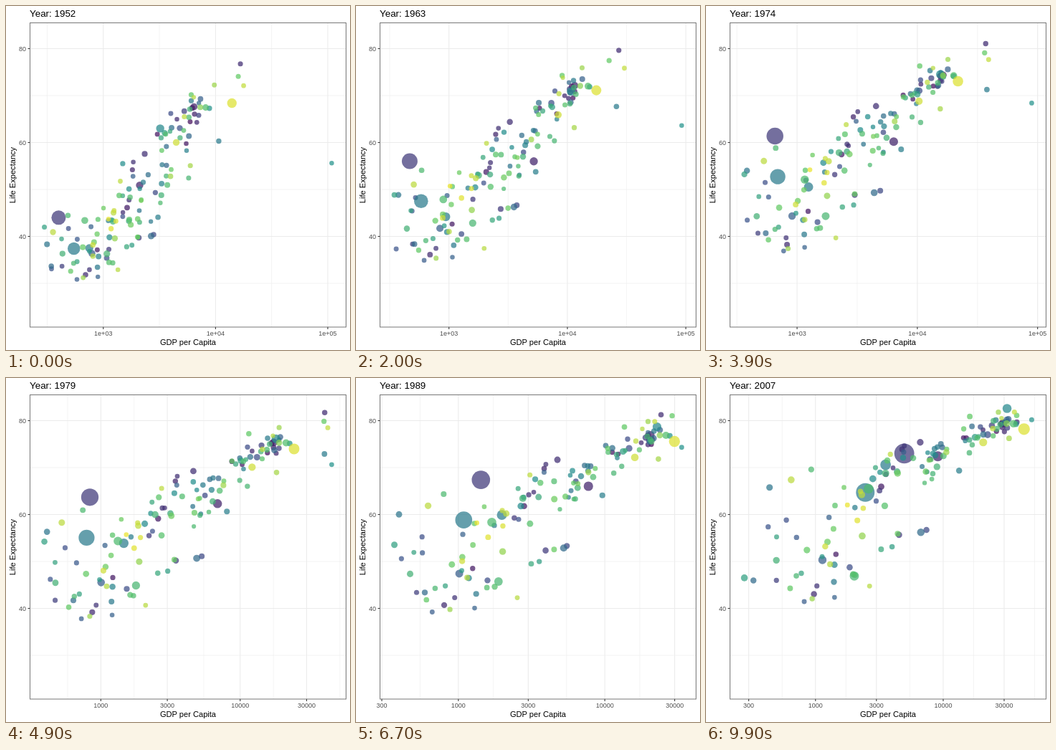
An HTML page that plays this animation: 480 by 480 pixels, repeating every 10000 ms.

```html
<!DOCTYPE html>
<html lang="en">
<head>
<meta charset="utf-8">
<title>Life expectancy by GDP</title>
<style>
  html, body { margin: 0; width: 100%; height: 100%; overflow: hidden; background: #fff; }
  svg { display: block; width: 480px; height: 480px; }
  text { font-family: "Liberation Sans", Arial, sans-serif; fill: #000; }
  .tick { font-size: 9px; fill: #4d4d4d; }
  .name { font-size: 11.1px; text-anchor: middle; }
  .head { font-size: 13.4px; }
  .grid { stroke: #ebebeb; stroke-width: 1.07; }
  .minor { stroke-width: .53; }
  .mark { stroke: #333; stroke-width: 1.07; }
</style>
</head>
<body>
<svg id="chart" viewBox="0 0 480 480">
  <rect width="480" height="480" fill="#fff"/>
  <g id="gridY"></g>
  <g id="gridX"></g>
  <g id="dots" fill-opacity=".72"></g>
  <rect x="33.5" y="23.5" width="441" height="424.5" fill="none" stroke="#777" stroke-width="1"/>
  <g id="axisX"></g>
  <text class="name" x="254" y="473">GDP per Capita</text>
  <text class="name" transform="translate(13 236) rotate(-90)">Life Expectancy</text>
  <text class="head" id="year" x="33" y="15"></text>
</svg>
<script>
const LOOP = 10000, STEP = 100, LAST = 99;
const LEFT = 33.5, RIGHT = 474.5, TOP = 23.5, BOTTOM = 448;
const RANKS = 141, MOST = 1319;
const $ = id => document.getElementById(id);

function add(parent, tag, attrs, text) {
  const el = document.createElementNS('http://www.w3.org/2000/svg', tag);
  for (const key in attrs) el.setAttribute(key, attrs[key]);
  if (text) el.textContent = text;
  parent.appendChild(el);
  return el;
}

const mix = ([a, b], p) => a + (b - a) * p;
const clamp = (v, a, b) => Math.min(b, Math.max(a, v));

// Reflect values that pass an edge, so nothing piles up there
function fold(v, lo, hi) {
  if (v < lo) v = 2 * lo - v;
  if (v > hi) v = 2 * hi - v;
  return clamp(v, lo, hi);
}

// Seeded noise, roughly normal with deviation 1
let seed = 1952;
function rand() {
  seed = (seed * 1664525 + 1013904223) % 4294967296;
  return seed / 4294967296;
}
const noise = () => (rand() + rand() + rand() - 1.5) * 2;

// Straight lines between [frame, value] keys
function track(keys, frame) {
  const i = Math.max(1, keys.findIndex(k => k[0] >= frame));
  const [f0, v0] = keys[i - 1], [f1, v1] = keys[i];
  return mix([v0, v1], (frame - f0) / (f1 - f0));
}

function colour(p) {
  const stops = [[68, 1, 84], [59, 82, 139], [33, 144, 140], [93, 200, 99], [253, 231, 37]];
  const i = Math.min(Math.floor(p * 4), 3);
  return `rgb(${stops[i].map((v, k) => Math.round(mix([v, stops[i + 1][k]], p * 4 - i)))})`;
}

// Ends of the data on the log10 scale
const low = [[0, 2.475], [9, 2.526], [45, 2.569], [54, 2.627], [81, 2.494], [90, 2.382], [99, 2.443]];
const high = [[0, 5.035], [9, 5.055], [27, 4.908], [36, 5.039], [54, 4.51], [63, 4.499], [81, 4.616], [99, 4.693]];

// Largest bubbles: people in millions, log GDP and life from start to end.
// The ease powers make growth early (below 1) or late (above 1).
const leaders = [
  { rank: 24, people: [556, 1319], gdp: [2.602, 3.695], gdpEase: 1.75, life: [44, 73], lifeEase: .55 },
  { rank: 58, people: [372, 1110], gdp: [2.738, 3.39], gdpEase: 2, life: [37.4, 64.7], lifeEase: .62 },
  { rank: 134, people: [158, 301], gdp: [4.146, 4.633], gdpEase: 1, life: [68.4, 78.2], lifeEase: .8 },
  { rank: 59, people: [82, 224], gdp: [2.875, 3.549], gdpEase: 1.2, life: [37.5, 70.6], lifeEase: 1 },
  { rank: 14, people: [57, 190], gdp: [3.324, 3.958], gdpEase: .3, life: [50.9, 72.4], lifeEase: .9 },
  { rank: 66, people: [86, 127], gdp: [3.507, 4.5], gdpEase: .4, life: [63, 82.6], lifeEase: .57 },
  { rank: 97, people: [41, 169], gdp: [2.835, 3.416], gdpEase: 1, life: [43.4, 65.5], lifeEase: 1 },
  { rank: 94, people: [33, 135], gdp: [3.032, 3.304], gdpEase: .3, life: [36.3, 46.9], lifeEase: .3 }
];

// Crowds: mean and spread at start and end; tie links wealth to life
const crowds = [
  { n: 51, tie: .55, gdp: [3, 3.22], gdpDev: [.25, .36], life: [39.3, 55], lifeDev: [5, 8] },
  { n: 24, tie: .75, gdp: [3.5, 3.93], gdpDev: [.25, .25], life: [53.5, 73.6], lifeDev: [8, 3.5] },
  { n: 25, tie: .8, gdp: [3.25, 3.78], gdpDev: [.34, .48], life: [47.5, 71.5], lifeDev: [8, 5] },
  { n: 32, tie: .85, gdp: [3.74, 4.4], gdpDev: [.24, .2], life: [65.3, 78.2], lifeDev: [4.5, 2.4] }
];

const dots = leaders.map(d => ({
  ...d,
  at: u => [mix(d.gdp, u ** d.gdpEase), mix(d.life, u ** d.lifeEase)]
}));

// One dot rides on each end of the axis
dots.push(
  { rank: 71, people: [1, 4], at: (u, lo, hi) => [hi, mix([55.6, 80.2], u ** .7)] },
  { rank: 80, people: [4, 40], at: (u, lo) => [lo, mix([42, 46.5], u) + 10 * Math.sin(Math.PI * u)] }
);

for (const c of crowds) {
  for (let i = 0; i < c.n; i++) {
    const a = noise();
    const lift = c.tie * a + Math.sqrt(1 - c.tie * c.tie) * noise();
    const people = Math.min(40, 4.5 * Math.exp(noise()));
    const phase = rand() * 7, sway = noise() * .03;
    dots.push({
      rank: rand() * RANKS,
      people: [people, people * 2.2],
      at: (u, lo, hi) => {
        const p = u ** .6;
        const gdp = mix(c.gdp, p) + a * mix(c.gdpDev, p) + sway * Math.sin(phase + 12 * u);
        const life = mix(c.life, p) + lift * mix(c.lifeDev, p);
        return [fold(gdp, lo, hi), fold(life, 29, 82)];
      }
    });
  }
}
dots.sort((p, q) => p.rank - q.rank);
for (const d of dots) d.el = add($('dots'), 'circle', { fill: colour(d.rank / RANKS) });

const yOf = life => 321.5 - (life - 40) * 6.55;

for (let v = 30; v <= 80; v += 10) {
  const y = yOf(v), major = v % 20 === 0;
  add($('gridY'), 'line', { class: major ? 'grid' : 'grid minor', x1: LEFT, x2: RIGHT, y1: y, y2: y });
  if (!major) continue;
  add($('gridY'), 'line', { class: 'mark', x1: LEFT - 3, x2: LEFT, y1: y, y2: y });
  add($('gridY'), 'text', { class: 'tick', x: 28, y: y + 3.2, 'text-anchor': 'end' }, String(v));
}

function drawAxis(xOf, lo, hi) {
  $('gridX').replaceChildren();
  $('axisX').replaceChildren();
  const wide = hi >= 5, seen = v => v >= lo && v <= hi;
  const major = [2, 3, 4, 5].flatMap(v => wide ? [v] : [v, v + Math.log10(3)]).filter(seen);
  const n = major.length;
  const minor = major.slice(1).map((v, i) => (v + major[i]) / 2);
  minor.push((3 * major[0] - major[1]) / 2, (3 * major[n - 1] - major[n - 2]) / 2);
  const rule = (v, cls) =>
    add($('gridX'), 'line', { class: cls, x1: xOf(v), x2: xOf(v), y1: TOP, y2: BOTTOM });
  minor.filter(seen).forEach(v => rule(v, 'grid minor'));
  for (const v of major) {
    const x = xOf(v);
    rule(v, 'grid');
    add($('axisX'), 'line', { class: 'mark', x1: x, x2: x, y1: BOTTOM, y2: BOTTOM + 3 });
    add($('axisX'), 'text', { class: 'tick', x, y: 460, 'text-anchor': 'middle' },
      wide ? '1e+0' + v : String(Math.round(10 ** v)));
  }
}

function draw(frame) {
  const u = frame / LAST, lo = track(low, frame), hi = track(high, frame);
  const pad = (hi - lo) * .05;
  const xOf = g => LEFT + (g - lo + pad) / (hi - lo + 2 * pad) * (RIGHT - LEFT);
  drawAxis(xOf, lo - pad, hi + pad);
  for (const d of dots) {
    const [gdp, life] = d.at(u, lo, hi);
    d.el.setAttribute('cx', xOf(gdp).toFixed(2));
    d.el.setAttribute('cy', yOf(life).toFixed(2));
    d.el.setAttribute('r', (2.9 + 11 * Math.sqrt(mix(d.people, u) / MOST)).toFixed(2));
  }
  $('year').textContent = 'Year: ' + Math.round(1952 + 55 * u);
}

const start = performance.now();
let shown = -1;
function tick() {
  const frame = Math.min(LAST, Math.floor((performance.now() - start) % LOOP / STEP));
  if (frame !== shown) draw(shown = frame);
  requestAnimationFrame(tick);
}
tick();
</script>
</body>
</html>
```
